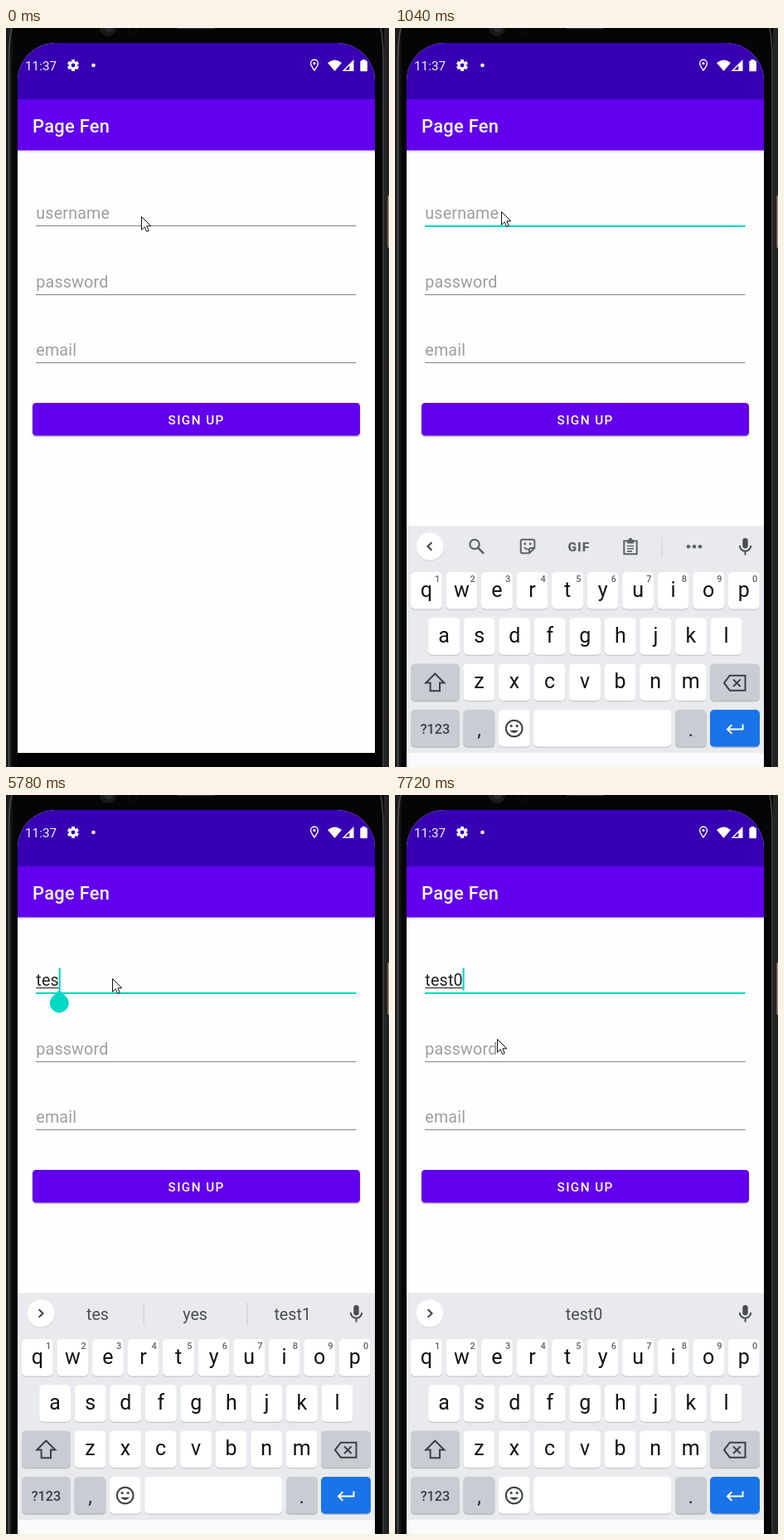
These frames come from a looping animation (462x891 px, 8000 ms). An HTML page with a canvas:

```html
<!DOCTYPE html>
<html lang="en">
<head>
<meta charset="utf-8">
<title>Sign up</title>
<style>
html, body { margin: 0; width: 100%; height: 100%; overflow: hidden; background: #050506; }
canvas { display: block; width: 462px; height: 891px; }
</style>
</head>
<body>
<canvas id="stage"></canvas>
<script>
const W = 462, H = 891, LOOP = 8000;
const TEAL = '#03dac5', PURPLE = '#6200ee', DEEP = '#3700b3';
const KEYBED = '#e8eaed', SPECIAL = '#c9ccd2', INK = '#3c4043';
const canvas = document.getElementById('stage');
const c = canvas.getContext('2d');
const dpr = window.devicePixelRatio || 1;
canvas.width = W * dpr;
canvas.height = H * dpr;

// Each step changes part of the state from its time on.
const steps = [
  [0, { mouse: [163, 227], keys: '', text: '', mark: 0, caret: false, handle: false, words: null }],
  [330, { mouse: [141, 215] }],
  [460, { mouse: [128, 210] }],
  [750, { keys: 'plain' }],
  [1040, { keys: 'full', mouse: [128, 221] }],
  [1340, { caret: true }],
  [1870, { caret: false }],
  [2180, { caret: true }],
  [4860, { text: 'tes', mark: 3, words: ['tes', 'yes', 'test1'] }],
  [5360, { caret: false, handle: true }],
  [5660, { caret: true }],
  [6060, { caret: false, handle: false }],
  [6190, { text: 'test', mark: 4, caret: true }],
  [6340, { words: ['test', 'test1', 'rest'] }],
  [6460, { mouse: [127, 272] }],
  [6580, { mouse: [126, 318] }],
  [6730, { caret: false }],
  [7180, { caret: true }],
  [7330, { mouse: [125, 306] }],
  [7450, { mouse: [123, 294], text: 'test0' }],
  [7600, { mark: 5 }],
  [7720, { words: ['', 'test0', ''] }]
];

function stateAt(t) {
  const s = {};
  for (const [at, patch] of steps) if (at <= t) Object.assign(s, patch);
  return s;
}

function rect(x, y, w, h, color) {
  c.fillStyle = color;
  c.fillRect(x, y, w, h);
}

function round(x, y, w, h, r, color) {
  c.beginPath();
  c.roundRect(x, y, w, h, r);
  c.fillStyle = color;
  c.fill();
}

function disc(x, y, r, color) {
  c.beginPath();
  c.arc(x, y, r, 0, Math.PI * 2);
  c.fillStyle = color;
  c.fill();
}

function ring(x, y, r, width, color) {
  c.beginPath();
  c.arc(x, y, r, 0, Math.PI * 2);
  c.lineWidth = width;
  c.strokeStyle = color;
  c.stroke();
}

function draw(d, color, width) {
  const p = new Path2D(d);
  if (width) {
    c.lineWidth = width;
    c.strokeStyle = color;
    c.stroke(p);
  } else {
    c.fillStyle = color;
    c.fill(p);
  }
}

function at(x, y, paint) {
  c.save();
  c.translate(x, y);
  paint();
  c.restore();
}

function label(str, x, y, size, color, { weight = 400, align = 'left', space = 0 } = {}) {
  c.font = `${weight} ${size}px Roboto, sans-serif`;
  c.letterSpacing = space + 'px';
  c.textAlign = align;
  c.fillStyle = color;
  c.fillText(str, x, y);
}

function bezel() {
  rect(0, 0, W, H, '#050506');
  rect(0, 0, 3, H, '#1a1a1b');
  const left = c.createLinearGradient(3, 0, 9, 0);
  left.addColorStop(0, '#242526');
  left.addColorStop(1, '#050506');
  rect(3, 0, 6, H, left);
  rect(456, 0, 6, H, '#232324');
  draw('M7 0Q3.5 14 3.5 40V891', '#4e4f51', 1.5);
  draw('M452 0Q455 14 455 40V891', '#454648', 1.5);
  round(460.5, 202, 3, 63, 1, '#a58a82');
  disc(123, 0, 10, '#19191b');
  disc(124, 0, 5, '#2a2b30');
  ring(153, 3, 5, 1, '#141416');
  rect(207, 0, 45, 1, '#37373a');
}

function gear(x, y) {
  at(x, y, () => {
    for (let i = 0; i < 6; i++) {
      rect(-1.9, -7, 3.8, 4, '#fff');
      c.rotate(Math.PI / 3);
    }
    ring(0, 0, 3.8, 2.8, '#fff');
  });
}

function statusBar() {
  rect(14, 18, 431, 68, DEEP);
  label('11:37', 23, 51, 15.3, '#f4f0fb');
  gear(81, 45);
  disc(105.5, 45, 2.3, '#fff');
  at(372, 44, () => {
    draw('M0 7C-3 3-4.4 1-4.4-1.3A4.4 4.4 0 0 1 4.4-1.3C4.4 1 3 3 0 7Z', '#fff', 1.4);
    disc(0, -1.3, 1.6, '#fff');
  });
  draw('M388 42Q396.5 35 405 42L396.5 52Z', '#fff');
  draw('M419.5 38V52H405.5Z', '#fff');
  draw('M414.3 45.2V50.6H409Z', DEEP);
  rect(429.5, 38, 4, 3, '#fff');
  round(427.3, 39.5, 8.6, 12.7, 1, '#fff');
}

function appBar() {
  rect(14, 86, 431, 61.5, PURPLE);
  const shade = c.createLinearGradient(0, 147.5, 0, 152);
  shade.addColorStop(0, 'rgba(0,0,0,.2)');
  shade.addColorStop(0.4, 'rgba(0,0,0,.06)');
  shade.addColorStop(1, 'rgba(0,0,0,0)');
  rect(14, 147.5, 431, 4.5, shade);
  label('Page Fen', 32, 126, 21.9, '#fff', { weight: 500, space: 0.27 });
}

function field(hint, base, value, focused) {
  if (value) label(value, 36.3, base, 19.7, '#212121', { space: 0.18 });
  else label(hint, 36.3, base, 19.7, '#9e9e9e', { space: 0.18 });
  if (focused) rect(36, base + 7.5, 386.5, 2.2, TEAL);
  else rect(36, Math.round(base + 7.8), 386.5, 1.1, '#8a8a8a');
}

function textWidth(str) {
  c.font = '400 19.7px Roboto, sans-serif';
  c.letterSpacing = '0.18px';
  return c.measureText(str).width;
}

function form(s) {
  field('username', 230.3, s.text, s.keys);
  field('password', 312.8, '', false);
  field('email', 395.2, '', false);
  if (s.mark) rect(36.3, 232, textWidth(s.text.slice(0, s.mark)), 1.2, '#333');
  const x = s.text ? 36.1 + textWidth(s.text) : 36.2;
  if (s.caret) rect(x, 208.5, 2.1, 27, TEAL);
  if (s.handle) {
    at(x + 0.6, 251, () => {
      c.rotate(-Math.PI / 4);
      round(-11.4, -11.4, 22.8, 22.8, [11.4, 0, 11.4, 11.4], TEAL);
    });
  }

  c.save();
  c.shadowColor = 'rgba(0,0,0,.3)';
  c.shadowBlur = 2 * dpr;
  c.shadowOffsetY = 1.2 * dpr;
  round(32, 452, 395, 39.5, 4.3, PURPLE);
  c.restore();
  label('SIGN UP', 195.5, 478, 15.3, '#fff', { weight: 500, space: 1.4 });
}

function key(x, y, w, color = '#fff') {
  round(x, y + 1.2, w, 44.5, 5, color === '#fff' ? '#c5c8cc' : '#b2b5bb');
  round(x, y, w, 44.5, 5, color);
}

function letters(row, x, y, hints) {
  [...row].forEach((ch, i) => {
    const mid = x + i * 42.55;
    key(mid - 18.9, y, 37.8);
    label(ch, mid, y + 29.8, 25, '#111', { align: 'center' });
    if (hints) label(String((i + 1) % 10), mid + 13.3, y + 12, 11, '#5f6368', { align: 'center', weight: 500 });
  });
}

function chevron(dir) {
  disc(42, 626, 17, '#d9dbde');
  disc(42, 625, 16.6, '#fff');
  at(42, 625, () => {
    c.scale(dir, 1);
    draw('M-2.3-4.8L2.5 0L-2.3 4.8', INK, 2);
  });
}

function mic() {
  round(419.3, 615, 6.4, 12.5, 3.2, '#4a4d51');
  draw('M415.8 624A6.7 6.7 0 0 0 429.2 624M422.5 631V635.5', '#4a4d51', 2);
}

function toolbar() {
  const ink = '#5f6368';
  chevron(-1);
  ring(96, 622.5, 5.7, 2.2, ink);
  draw('M100 626.5L107 633.7', ink, 2.6);
  at(160, 625, () => {
    draw('M-6-8.3H6Q8.3-8.3 8.3-6V2L2 8.3H-6Q-8.3 8.3-8.3 6V-6Q-8.3-8.3-6-8.3ZM2 8V4Q2 2 4 2H8', ink, 2);
    disc(-3.2, -3, 1.4, ink);
    disc(3.2, -3, 1.4, ink);
    draw('M-4 1Q-2 4 1 3.6', ink, 1.7);
  });
  label('GIF', 221.8, 630.5, 15.5, ink, { weight: 900, align: 'center', space: 1 });
  at(284, 626, () => {
    draw('M-7.7-7.5H7.7V8.3H-7.7Z', ink, 2);
    rect(-4, -9, 8, 4.5, ink);
    disc(0, -9, 2.2, ink);
    draw('M-4-1.5H4M-4 1.7H4M-4 4.9H2', ink, 1.6);
  });
  rect(321.5, 613, 1, 25, '#cfd2d6');
  for (const x of [354, 361, 368]) disc(x, 625.3, 2.3, ink);
  mic();
}

function suggestions(words) {
  chevron(1);
  words.forEach((w, i) => label(w, 110.5 + i * 117.6, 633, 19.7, '#4a4d51', { align: 'center' }));
  if (words[0]) for (const x of [165.7, 290.5]) rect(x, 612, 1, 27, '#c8cbcf');
  mic();
}

function keyboard(s) {
  const full = s.keys === 'full';
  rect(14, 600.5, 431, 273.5, KEYBED);
  if (!full) {
    for (let i = 0; i < 10; i++) {
      label(String((i + 1) % 10), 37.5 + i * 42.55, 635, 25, '#1b1b1b', { align: 'center' });
    }
  } else if (s.words) suggestions(s.words);
  else toolbar();

  letters('qwertyuiop', 37.8, 656, full);
  letters('asdfghjkl', 59.1, 711.3, false);
  letters('zxcvbnm', 101.4, 766.6, false);

  key(19, 766.6, 59, SPECIAL);
  draw('M48.3 778.5L59.3 789.5H54V799.3H42.6V789.5H37.3Z', INK, 2);
  key(380, 766.6, 60, SPECIAL);
  at(410, 789.7, () => {
    draw('M-13 0L-6.2-9H12.5V9H-6.2Z', INK, 2);
    draw('M-2-4.3L6.6 4.3M6.6-4.3L-2 4.3', INK, 2);
  });

  key(19, 822, 59, SPECIAL);
  label('?123', 48.4, 851, 16.2, INK, { weight: 500, align: 'center' });
  key(82.5, 822, 37.8, SPECIAL);
  label(',', 101.4, 854, 23, '#222', { align: 'center' });
  if (full) {
    key(125, 822, 37.6);
    ring(143.7, 844.5, 9.8, 2, INK);
    disc(140.2, 841.5, 1.6, INK);
    disc(147.2, 841.5, 1.6, INK);
    draw('M138.3 846.7Q143.7 853.5 149.1 846.7Z', INK);
    key(167.2, 822, 165.8);
  } else key(125, 822, 208);
  key(338, 822, 37.8, SPECIAL);
  label('.', 356.9, 854, 23, '#222', { align: 'center' });
  key(380, 822, 60, '#1a73e8');
  if (full) draw('M419.5 839.5V845.5H401.5M406.3 840.3L401 845.5L406.3 850.7', '#fff', 2);
  else draw('M401.5 845L407 850.5L418.8 838.8', '#fff', 2);
}

function pointer([x, y]) {
  at(x + 0.5, y + 0.5, () => {
    const d = 'M0 0V15.8L3.7 12.3L6.2 18L8.8 16.9L6.3 11.3H11.3Z';
    draw(d, '#fff');
    draw(d, '#111', 1);
  });
}

function paint(t) {
  const s = stateAt(t);
  c.setTransform(dpr, 0, 0, dpr, 0, 0);
  bezel();
  c.save();
  c.beginPath();
  c.roundRect(14, 18, 431, 920, 46);
  c.clip();
  rect(14, 18, 431, 856, '#fefefe');
  statusBar();
  appBar();
  rect(14, 874, 431, 17, s.keys === 'full' ? '#fafafa' : '#000');
  form(s);
  if (s.keys) keyboard(s);
  if (s.keys === 'plain') disc(98.5, 892.5, 3.5, '#3c3d3f');
  c.restore();
  pointer(s.mouse);
}

const start = performance.now();
function tick() {
  paint((performance.now() - start) % LOOP);
  requestAnimationFrame(tick);
}
tick();
</script>
</body>
</html>
```
